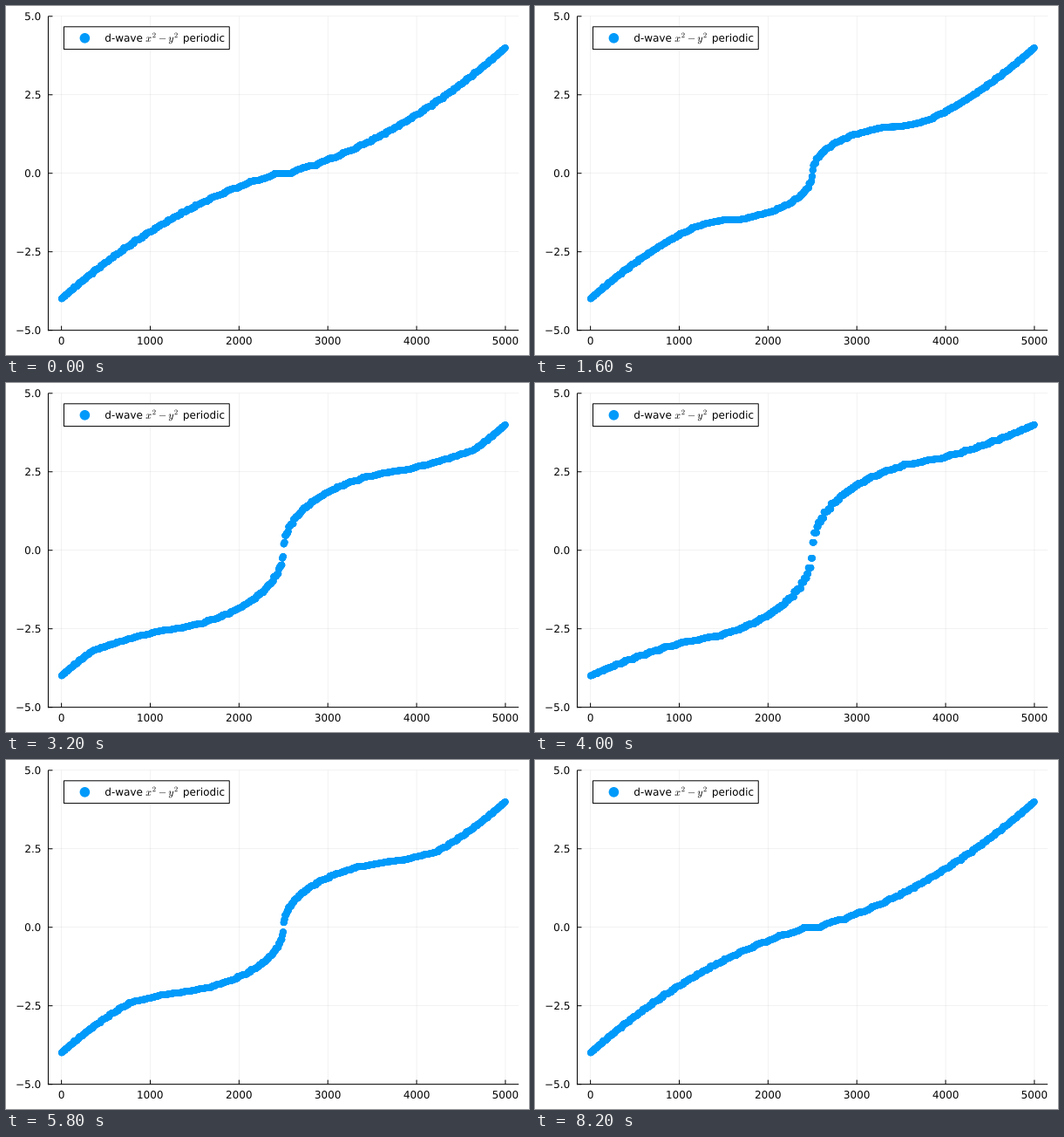
A matplotlib script that plays this animation: 600 by 400 pixels, repeating every 8.4 s.

```python
import numpy as np
import matplotlib.pyplot as plt
from matplotlib.animation import FuncAnimation
from matplotlib.patches import Circle, PathPatch, Rectangle
from matplotlib.textpath import TextPath
from matplotlib.transforms import Affine2D

W, H, DPI = 600, 400, 100
PX = 72 / DPI                      # points per pixel
LEFT, RIGHT, TOP, BOTTOM = 48.45, 588.2, 11.8, 371.65
SITES = 50                         # lattice sites per side
STATES = 2 * SITES**2
STEPS = 20
BLUE = "#009afa"

plt.rcParams["font.family"] = "DejaVu Sans"
plt.rcParams["mathtext.fontset"] = "cm"

PAD = 0.03 * (STATES - 1)
X_MIN, X_MAX = 1 - PAD, STATES + PAD


def to_x(v):
    return LEFT + (v - X_MIN) / (X_MAX - X_MIN) * (RIGHT - LEFT)


def to_y(v):
    return BOTTOM - (v + 5) / 10 * (BOTTOM - TOP)


def spectrum(gap):
    """Sorted quasiparticle energies of a periodic d-wave lattice."""
    c = np.cos(2 * np.pi * np.arange(SITES) / SITES)
    cx, cy = np.meshgrid(c, c)
    e = 2 * np.hypot(cx + cy, gap * (cx - cy)).ravel()
    return np.sort(np.concatenate([-e, e]))


fig = plt.figure(figsize=(W / DPI, H / DPI), dpi=DPI, facecolor="white")
ax = fig.add_axes([0, 0, 1, 1])
ax.set_xlim(0, W)
ax.set_ylim(H, 0)
ax.axis("off")


def line(xs, ys, width=1.0, alpha=1.0, z=3):
    ax.plot(xs, ys, color="black", lw=width * PX, alpha=alpha, zorder=z,
            solid_capstyle="butt", snap=False)


def grid(xs, ys):
    line(xs, ys, width=0.5, alpha=0.1, z=1)


def label(x, y, s, align="left"):
    """Text as unhinted outlines, so that it keeps its sub-pixel place."""
    path = TextPath((0, 0), s, size=12)
    box = path.get_extents()
    x -= {"left": 0, "center": (box.x0 + box.x1) / 2, "right": box.x1}[align]
    path = path.transformed(Affine2D().scale(1, -1).translate(x, y))
    ax.add_patch(PathPatch(path, fc="black", ec="none", lw=0, zorder=6,
                           snap=False))


# Axes, grid and tick labels
for v in range(0, 5001, 1000):
    x = to_x(v)
    grid([x, x], [TOP, BOTTOM])
    line([x, x], [BOTTOM, BOTTOM - 5])
    label(x, 387.9, str(v), "center")
for v in np.arange(-5, 5.1, 2.5):
    y = to_y(v)
    grid([LEFT, RIGHT], [y, y])
    line([LEFT, LEFT + 5], [y, y])
    label(39.4, y + 4.3, f"{v:.1f}".replace("-", "\u2212"), "right")
line([LEFT, LEFT], [TOP, BOTTOM + 0.5])
line([LEFT - 0.5, RIGHT], [BOTTOM, BOTTOM])

# Legend
ax.add_patch(Rectangle((66.45, 23.8), 189.8, 25.8, fc="white", ec="black",
                       lw=PX, zorder=4, snap=False))
ax.add_patch(Circle((90.4, 36.8), 5.8, fc=BLUE, ec="none", zorder=5))
label(113.3, 40.8, "d-wave")
label(160.2, 40.8, "$x^2-y^2$")
label(202.9, 40.8, "periodic")

# Two equal sizes keep the markers at sub-pixel positions
xs = to_x(np.arange(1, STATES + 1))
size = (2 * 3.7 * PX) ** 2
dots = ax.scatter(xs, to_y(spectrum(0)), s=[size, size] * (STATES // 2),
                  color=BLUE, linewidths=0, zorder=3.5)


def draw(i):
    step = min(i, 2 * STEPS + 1 - i)
    dots.set_offsets(np.column_stack([xs, to_y(spectrum(step / STEPS))]))
    return (dots,)


anim = FuncAnimation(fig, draw, frames=2 * STEPS + 2, interval=200,
                     init_func=lambda: draw(0), repeat=True)
plt.show()
```
